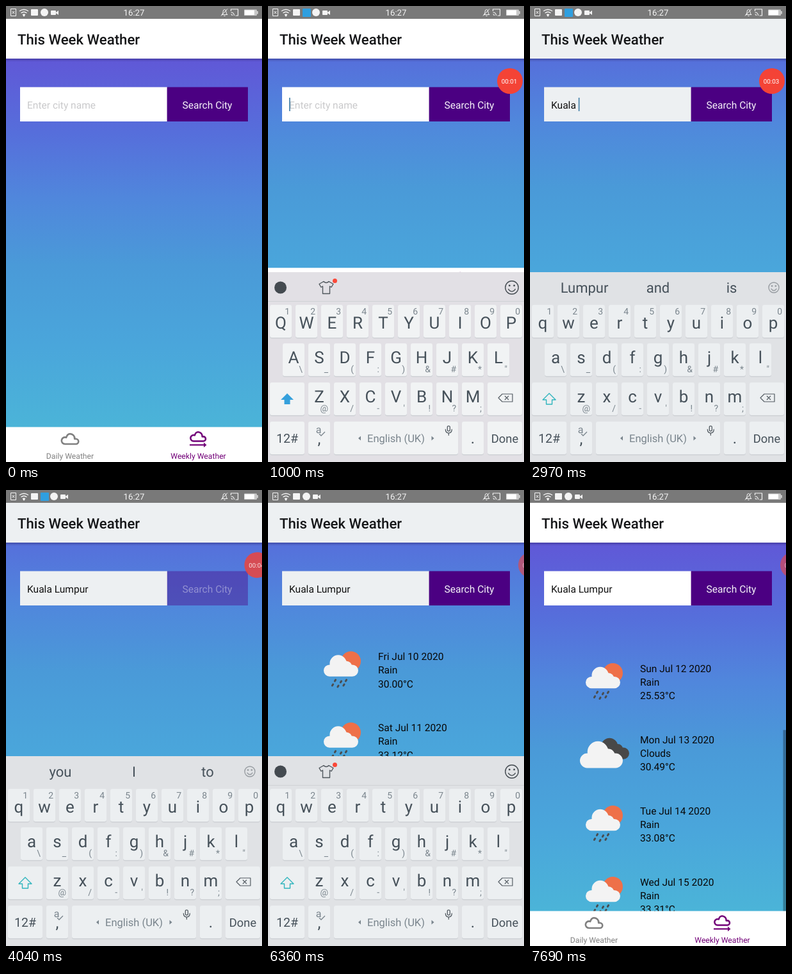
Recreate the animation shown at these times as an HTML page with a canvas. Size 400x711 px, loop 8 s.

```html
<!DOCTYPE html>
<html lang="en">
<head>
<meta charset="utf-8">
<title>Weekly weather</title>
<style>
html, body { margin: 0; height: 100%; overflow: hidden; }
canvas { display: block; }
</style>
</head>
<body>
<canvas id="stage" width="400" height="711"></canvas>
<script>
const g = document.getElementById('stage').getContext('2d');
g.textRendering = 'geometricPrecision';
const LOOP = 8000, KEYBOARD_TOP = 415, TAB_HEIGHT = 54.4;
const INK = '#46515a', HINT = '#7a858d', BLUE = '#35a0dc', PURPLE = '#720078';

const ramp = (t, a, b) => Math.min(1, Math.max(0, (t - a) / (b - a)));
const smooth = (t, a, b) => { const p = ramp(t, a, b); return p * p * (3 - 2 * p); };
const mix = (a, b, p) => a + (b - a) * p;
const latest = (list, t) => list.filter(e => e[0] <= t).pop();

function rect(x, y, w, h, color, r = 0) {
  g.fillStyle = color;
  g.beginPath();
  g.roundRect(x, y, w, h, r);
  g.fill();
}
function disc(x, y, r, color) {
  g.fillStyle = color;
  g.beginPath();
  g.arc(x, y, r, 0, 7);
  g.fill();
}
function text(s, x, y, size, color, align = 'left', weight = 400) {
  g.font = `${weight} ${size}px Roboto, sans-serif`;
  g.textAlign = align;
  g.fillStyle = color;
  g.fillText(s, x, y);
}
// SVG path drawn at an offset, stroked or filled
function path(d, x, y, color, width = 1.3, scale = 1, fill = false) {
  g.save();
  g.translate(x, y);
  g.scale(scale, scale);
  g.lineWidth = width;
  g.strokeStyle = g.fillStyle = color;
  g.lineJoin = 'round';
  const p = new Path2D(d);
  fill ? g.fill(p) : g.stroke(p);
  g.restore();
}
function faded(alpha, draw) {
  g.save();
  g.globalAlpha *= alpha;
  draw();
  g.restore();
}

// Typing: value, suggestions, and key presses
const values = [[0, ''], [1480, 'K'], [1780, 'Ku'], [2030, 'Kua'], [2330, 'Kual'],
  [2600, 'Kuala'], [2760, 'Kuala '], [3250, 'Kuala Lumpur']];
const suggestions = [[0, null], [1480, ['K', 'I', 'Know']], [1780, ['Ku', 'Kuala', 'Just']],
  [2030, ['Kua', 'Kuala', 'Just']], [2330, ['Kual', 'Kuala', 'Dual']],
  [2760, ['Lumpur', 'and', 'is']], [3250, ['you', 'I', 'to']], [5410, null]];
const presses = [['k', 1320, 1480], ['u', 1640, 1780], ['a', 1850, 2030],
  ['l', 2200, 2330], ['a', 2480, 2600]];
const rows = [
  ['qwertyuiop', '1234567890', 20, 466],
  ['asdfghjkl', '\\_(:)&#*"', 40, 526],
  ['zxcvbnm', "@/-'!?;", 80, 587]
];
const days = [['Fri Jul 10', 'Rain', '30.00'], ['Sat Jul 11', 'Rain', '33.12'],
  ['Sun Jul 12', 'Rain', '25.53'], ['Mon Jul 13', 'Clouds', '30.49'],
  ['Tue Jul 14', 'Rain', '33.08'], ['Wed Jul 15', 'Rain', '33.31']];
const cloudLine = 'M6 18A4 4 0 1 1 7.5 10.3C8.3 7.6 10 6 12 6A5.5 5.5 0 0 1 17.5 12H19A3 3 0 0 1 19 18Z';

function statusBar(t) {
  rect(0, 0, 400, 20, '#797979');
  const w = '#f4f4f4';
  path('M.5.5H8.5V11.5H.5ZM2.8 4L6.2 8M6.2 4L2.8 8', 7, 4, w, 1);
  path('M0 3Q7 -2 14 3M2.5 6Q7 2.5 11.5 6M5 9Q7 7 9 9', 21, 5, w, 1.3);
  disc(28, 15, 1.4, w);
  rect(39, 5, 11, 10, w, 1);
  const shift = t >= 100 && t < 5410 ? 15 : 0;
  if (shift) rect(54, 4, 13, 13, '#2f9fe0', 1);
  disc(60 + shift, 10, 6, w);
  rect(70 + shift, 7, 8, 7, w, 1);
  path('M0 3L4 0V7L0 4Z', 78 + shift, 7, w, 1, 1, true);
  text('16:27', 200, 15, 13.2, w, 'center');
  path('M1 9Q3 8 3 5Q3 1 5.5 1Q8 1 8 5Q8 8 10 9ZM4.5 11H6.5M0 11L10 0', 336, 4.5, w, 1);
  path('M0 3V0H11V10H7M0 5Q5 5 5 10M0 8Q2 8 2 10', 351.5, 5, w, 1.2);
  rect(372, 5.5, 20, 9.5, '#c9c9c9', 1);
  rect(373, 6.5, 15, 7.5, '#fff');
  rect(392, 8, 2, 4.5, '#c9c9c9');
}

// One path, so that a faded cloud shows no overlaps
function cloud(x, y, w, color) {
  g.fillStyle = color;
  g.beginPath();
  [[.17, .455, .17], [.42, .25, .245], [.66, .34, .16], [.83, .455, .17]].forEach(([a, b, r]) => {
    g.moveTo(x + (a + r) * w, y + b * w);
    g.arc(x + a * w, y + b * w, r * w, 0, 2 * Math.PI);
  });
  g.rect(x + .17 * w, y + .4 * w, .66 * w, .225 * w);
  g.fill();
}

function dayRow([date, kind, temp], top) {
  const mid = top + 56;
  if (kind === 'Rain') {
    disc(129.5, mid - 14, 15.5, '#ee7049');
    cloud(87, mid - 24, 54, '#f3f3f3');
    g.lineCap = 'round';
    [[105, 16], [114, 18], [122, 16], [101, 23], [109.5, 25], [118.5, 23]]
      .forEach(([x, y]) => path('M.6 -1L-.6 1', x, mid + y, '#4a4d50', 3));
    g.lineCap = 'butt';
  } else {
    cloud(102, mid - 24, 53, '#484848');
    cloud(78, mid - 19, 67, '#f3f3f3');
  }
  [date + ' 2020', kind, temp + '°C']
    .forEach((s, i) => text(s, 172, mid - 15.7 + 21.1 * i, 15.55, '#080808'));
}

function list(t, bottom) {
  if (t < 5410) return;
  const scroll = 203.5 * smooth(t, 7160, 7690);
  g.save();
  g.beginPath();
  g.rect(0, 225, 400, bottom - 225);
  g.clip();
  days.forEach((d, i) => {
    const dim = i === 2 ? ramp(t, 7060, 7200) - ramp(t, 7260, 7410) : 0;
    faded(1 - .8 * dim, () => dayRow(d, 225 + 111 * i - scroll));
  });
  faded(.3 * ramp(t, 7150, 7230), () => rect(395.5, 225 + scroll * .734, 4.5, 478, '#000'));
  g.restore();
}

function searchBox(t, paper) {
  rect(22, 126.5, 230, 53.5, paper);
  const value = latest(values, t)[1];
  if (value) text(value, 33, 159.5, 15.55, '#101010');
  else text('Enter city name', 33, 159.5, 15.55, '#c9c9cb');
  g.font = '15.55px Roboto, sans-serif';
  const width = g.measureText(value).width;
  if (t >= 1480 && t < 2760) rect(33, 161, width, 1, '#222');
  if (t >= 640 && t < 3600) rect(33 + width, 143, 1.8, 21, '#4f88ad');
  const pressed = ramp(t, 3930, 4080) - ramp(t, 4250, 4450);
  faded(1 - .8 * pressed, () => {
    rect(251.6, 126.5, 126.4, 53.5, '#4b0082');
    text('Search City', 314.5, 159.5, 15.55, '#f6f2f8', 'center');
  });
}

function tabBar(y) {
  rect(0, y, 400, 60, '#fff');
  path(cloudLine, 84.2, y + 2.6, '#808080', 2, 1.32);
  text('Daily Weather', 100, y + 49.4, 12.2, '#808080', 'center');
  path(cloudLine, 286, y + .6, PURPLE, 2.2, 1.18);
  path('M0 0H23', 287, y + 27.8, PURPLE, 2.2);
  path('M0 0L4.5 3.8L0 7.6Z', 309, y + 24, PURPLE, 1, 1, true);
  text('Weekly Weather', 300.5, y + 49.4, 12.2, PURPLE, 'center');
}

function badge(t) {
  if (t < 100) return;
  const away = ramp(t, 3870, 4260), x = mix(378, 411, away);
  faded(mix(1, .58, away), () => {
    disc(x, 117, 20, '#f44336');
    const s = Math.floor((t + 110) / 1000);
    text('00:0' + s, x - 1, 120.5, 9.8, '#fff', 'center');
  });
}

function smiley(r, color) {
  path(`M${r} 0A${r} ${r} 0 1 1 ${-r} 0A${r} ${r} 0 1 1 ${r} 0M${-.55 * r} ${.2 * r}Q0 ${r} ${.55 * r} ${.2 * r}`,
    381, 439, color, 1.4);
  disc(381 - .36 * r, 439 - .3 * r, 1.4, color);
  disc(381 + .36 * r, 439 - .3 * r, 1.4, color);
}

function key(x, y, w, color) {
  rect(x, y + 1, w, 51.5, '#cfd2d6', 3);
  rect(x, y, w, 51, color, 3);
}

function keyboard(t) {
  const early = t < 1320, upper = t < 1480;
  const face = early ? '#f1f3f4' : '#eceff1';
  const label = c => upper ? c.toUpperCase() : c;
  const pressed = presses.find(p => t >= p[1] && t < p[2]);
  rect(0, KEYBOARD_TOP, 400, 296, early ? '#e2e0e5' : '#e0e2e5');

  const words = latest(suggestions, t)[1];
  if (words) {
    const composing = t < 2760;
    if (composing) rect(139, 415, 122, 47, face);
    words.forEach((w, i) => {
      const main = composing && i === 1;
      text(w, 85 + 115 * i, 447, 22, main ? BLUE : INK, 'center', main ? 700 : 400);
    });
    smiley(8, '#989da2');
  } else {
    disc(19.5, 439, 9.5, '#444a50');
    path('M7 0Q11 4 15 0L22 4L19 9L16.5 7.5V19H5.5V7.5L3 9L0 4Z', 80, 429.5, '#50575d', 1.4);
    disc(104.5, 428.5, 3.5, '#fa4838');
    smiley(10.2, '#454c52');
    rect(0, 460, 400, 1, '#cfd1d4');
  }

  let popup = null;
  rows.forEach(([letters, hints, x0, y], row) => [...letters].forEach((c, i) => {
    const x = x0 + 40 * i, down = pressed && pressed[0] === c;
    key(x - 17, y, 34, down ? '#a4a7ad' : face);
    text(label(c), x, y + (row ? 31 : 37), 26, INK, 'center');
    text(hints[i], x + 14, y + (row ? 45 : 14.5), 14, HINT, 'right');
    if (down) popup = [label(c), x, y - 92];
  }));

  key(3, 587, 54, face);
  path('M10 0L20 10H14.5V17H5.5V10H0Z', 20, 604, upper ? BLUE : '#2fb5bd', 1.4, 1, upper);
  key(343, 587, 54, face);
  path('M6 0H22V12H6L0 6ZM10 3L16 9M16 3L10 9', 360, 605, '#535b62', 1.2);

  key(3, 648, 54, face);
  text('12#', 30, 681, 19.5, INK, 'center');
  key(63, 648, 34, face);
  text('a', 79, 666, 16, HINT, 'center');
  path('M0 3L3 6L9 0', 80, 664, HINT, 1.4);
  text(',', 80, 683, 25, INK, 'center');
  key(103, 648, 194, face);
  text('English (UK)', 200, 680, 16.5, HINT, 'center');
  path('M4 0V7L0 3.5Z', 141, 670.5, HINT, 1, 1, true);
  path('M0 0V7L4 3.5Z', 255.5, 670.5, HINT, 1, 1, true);
  path('M4 2Q4 0 6 0Q8 0 8 2V6Q8 8 6 8Q4 8 4 6ZM1 5Q1 11 6 11Q11 11 11 5M6 11V15', 276.3, 654.8, '#535b62');
  key(303, 648, 34, face);
  text('.', 320, 682, 24, INK, 'center');
  key(343, 648, 54, face);
  text('Done', 370, 681, 18.4, INK, 'center');

  if (popup) {
    const [c, x, y] = popup;
    g.save();
    g.shadowColor = 'rgba(0,0,0,.4)';
    g.shadowBlur = 4;
    g.shadowOffsetY = 1;
    rect(x - 28, y, 56, 78, '#eceff1', 2);
    g.restore();
    text(c, x, y + 55, 39, '#51565b', 'center');
    text('...', x + 19, y + 74, 14, INK, 'center');
  }
}

function draw(t) {
  const resized = t >= 640 && t < 6600;
  const bottom = resized ? KEYBOARD_TOP : 711;
  const paper = t >= 1320 && t < 6500 ? '#edf0f2' : '#fff';

  // The backdrop keeps its height and is centred in the visible area
  const top = resized ? -39 : 82;
  const sky = g.createLinearGradient(0, top, 0, top + 575);
  [[0, '#6058d7'], [.2, '#566edb'], [.38, '#5087dc'], [.56, '#4a9ad8'], [.78, '#4aa6db'], [1, '#4bb4d8']]
    .forEach(s => sky.addColorStop(...s));
  rect(0, 0, 400, 711, sky);

  list(t, bottom);
  searchBox(t, paper);

  let tabY = 711 - TAB_HEIGHT;
  if (resized) tabY = mix(KEYBOARD_TOP - TAB_HEIGHT, KEYBOARD_TOP, smooth(t, 790, 1060));
  else if (t >= 6600) tabY = 711 - TAB_HEIGHT * smooth(t, 6800, 7050);
  tabBar(tabY);

  const shade = g.createLinearGradient(0, 82, 0, 87);
  shade.addColorStop(0, 'rgba(30,20,90,.38)');
  shade.addColorStop(1, 'rgba(30,20,90,0)');
  rect(0, 82, 400, 5, shade);
  rect(0, 20, 400, 62, paper);
  text('This Week Weather', 18, 60, 22.2, '#141517', 'left', 500);
  statusBar(t);

  const shown = smooth(t, 440, 640) - smooth(t, 6480, 6690);
  if (shown > 0) {
    g.save();
    g.translate(0, 296 * (1 - shown));
    keyboard(t);
    g.restore();
  }
  badge(t);
}

const start = performance.now();
function frame() {
  draw((performance.now() - start) % LOOP);
  requestAnimationFrame(frame);
}
frame();
</script>
</body>
</html>
```
